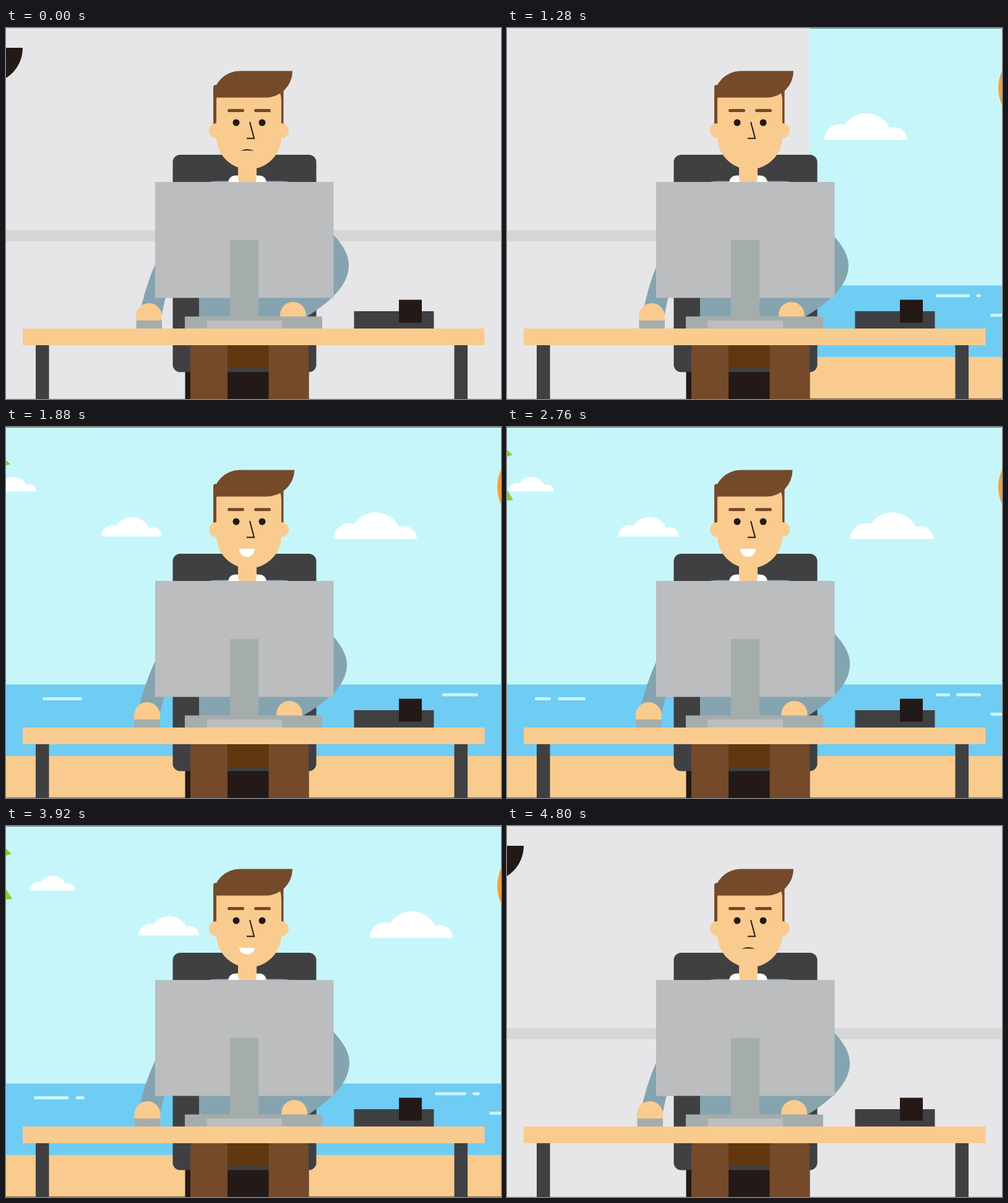
An HTML page that plays this animation: 800 by 600 pixels, repeating every 4840 ms.

```html
<!DOCTYPE html>
<html lang="en">
<head>
<meta charset="utf-8">
<title>Desk daydream</title>
<style>
  html, body { margin: 0; width: 100%; height: 100%; overflow: hidden; background: #e6e6e8; }
  svg { display: block; width: 800px; height: 600px; }
  .skin { fill: #f9cb8f; }
  .hair { fill: #754a2a; }
  .dark { fill: #404042; }
  .black { fill: #231916; }
  .shirt { fill: #85a4af; }
  .panel { fill: #bbbdbf; }
  .metal { fill: #a5adac; }
  .white { fill: #fff; }
  .leaf { fill: #8fc931; }
  .foam { fill: none; stroke: #c6f6fa; stroke-width: 5; stroke-linecap: round; }
</style>
</head>
<body>
<svg viewBox="0 0 800 600">
  <defs>
    <path id="cloud" d="M0 44A25 25 0 0 1 33 20A42 42 0 0 1 106 25A20 20 0 0 1 134 44Z"/>
  </defs>

  <g id="beach">
    <rect width="800" height="417" fill="#c6f6fa"/>
    <rect y="416.5" width="800" height="116" fill="#6fccf3"/>
    <rect class="skin" y="532" width="800" height="68"/>
    <circle cx="862" cy="97" r="68" fill="#f9a03a"/>
    <g class="white">
      <use id="cloud1" href="#cloud"/>
      <use id="cloud2" href="#cloud"/>
      <use id="cloud3" href="#cloud"/>
    </g>
    <path id="foam1" class="foam" d="M47.5 439.5h77" stroke-dasharray="59 16"/>
    <path id="foam2" class="foam" d="M695.5 433h68" stroke-dasharray="53 15"/>
    <path id="foam3" class="foam" d="M783.5 464.5h60" stroke-dasharray="110 22"/>
    <path id="leaf1" class="leaf" d="M-20 20L0 37L9 45L0 48L-20 53Z"/>
    <path id="leaf2" class="leaf" d="M-14 78L0 102L10 118L0 119L-20 121Z"/>
    <path d="M0 .5H800M0 599.5H800" stroke="#000" stroke-opacity=".5"/>
  </g>

  <g id="wall">
    <rect width="800" height="600" fill="#e6e6e8"/>
    <rect y="327" width="800" height="18" fill="#d6d6d6"/>
    <path d="M0 .5H800M0 599.5H800" stroke="#000" stroke-opacity=".1"/>
  </g>
  <path id="lamp" class="black" d="M-89 32H27A58 58 0 0 1 -89 32Z"/>

  <rect class="black" x="289.5" y="540" width="200" height="60"/>
  <rect class="dark" x="269.5" y="205" width="232" height="351.5" rx="12"/>
  <path fill="#613710" d="M350 505H430V550H350Z"/>
  <g class="hair">
    <rect x="298" y="511" width="60" height="100" rx="6"/>
    <rect x="424.5" y="511" width="64.5" height="100" rx="6"/>
  </g>

  <path class="shirt" d="M312 486V262Q318 247.5 340 247.5H445Q470 247.5 480 262V466H462V486Z"/>
  <path id="armL" class="shirt"/>
  <path id="armR" class="shirt"/>
  <path class="white" d="M359 252Q359 238.500 372 238.500H408Q421 238.500 421 252Z"/>
  <path class="skin" d="M375 215H405V240Q405 250 400 252H380Q375 250 375 240Z"/>

  <g id="head">
    <rect class="hair" x="335" y="92" width="113.500" height="69" rx="4"/>
    <g class="skin">
      <circle cx="340" cy="166" r="12"/>
      <circle cx="445" cy="166" r="12"/>
      <path d="M340 176V118Q340 100 352 100H438Q445 103 445 118V176A52.500 52.500 0 0 1 340 176Z"/>
    </g>
    <path id="hair" class="hair"/>
    <g class="hair">
      <rect x="358" y="131" width="27" height="5" rx="2.500"/>
      <rect x="401" y="131" width="27" height="5" rx="2.500"/>
    </g>
    <g class="black">
      <circle cx="372" cy="153" r="5.500"/>
      <circle cx="414" cy="153" r="5.500"/>
    </g>
    <path d="M394 152L401 178.500H389" fill="none" stroke="#231916" stroke-width="2"/>
    <path id="frown" class="black" d="M379 198.500Q390 193.500 401 198.500Q390 197.500 379 198.500Z"/>
    <path id="smile" class="white" d="M-12.500 0H12.500A12.500 13 0 0 1 -12.500 0Z"/>
  </g>

  <rect class="panel" x="241" y="249" width="288.500" height="187.500"/>
  <g id="handL">
    <path class="skin" d="M210 473V466A21 21 0 0 1 252 466V473Z"/>
    <rect class="metal" x="210.500" y="473" width="41.500" height="13"/>
  </g>
  <path id="handR" class="skin" d="M443 468V464A21 21 0 0 1 485 464V468Z"/>
  <rect class="metal" x="362" y="343" width="46" height="130"/>
  <rect class="metal" x="289" y="466.500" width="222" height="20"/>
  <rect class="panel" x="324.500" y="473" width="121.500" height="13"/>

  <g class="dark">
    <rect x="562.500" y="458" width="129" height="28"/>
    <rect x="48" y="512" width="21.500" height="88"/>
    <rect x="724.500" y="512" width="21.500" height="88"/>
  </g>
  <rect class="black" x="635" y="439.500" width="37" height="37"/>
  <rect class="skin" x="27" y="486" width="746.500" height="27"/>
</svg>

<script>
const LOOP = 4840;
const $ = id => document.getElementById(id);
const set = (id, name, value) => $(id).setAttribute(name, value);
const move = (id, x, y = 0, scale = 1) =>
  set(id, "transform", `translate(${x} ${y}) scale(${scale})`);
const clamp = v => Math.min(1, Math.max(0, v));
const span = (t, from, to) => clamp((t - from) / (to - from));
const easeOut = u => 1 - (1 - u) ** 2.3;
const smooth = u => u * u * (3 - 2 * u);

// Eased value at t along [time, value] stops.
function track(t, stops) {
  let [t0, v0] = stops[0];
  for (const [t1, v1] of stops) {
    if (t < t1) return v0 + (v1 - v0) * smooth(span(t, t0, t1));
    [t0, v0] = [t1, v1];
  }
  return v0;
}

const MOUSE = [[1160, 0], [1440, 7.5], [1880, -3], [2760, -2], [3920, -2.5], [4480, 0]];
const TYPING = [[0, 0], [760, 4], [1440, -5.5], [1880, -6], [2760, 0.5], [3920, 2], [4520, 0]];
const LAMP = [[1060, 0], [1200, -30], [4480, -30], [4680, 0]];
const SMILE = [[1270, 0], [1480, 1], [3860, 1], [4080, 0]];
const LEAF_X = [[1720, -14], [1880, -2], [2240, 0]];
const LEAF_Y = [[1720, 28], [1880, 15], [2320, -5], [2640, 0]];
const LEAF2_X = [[1880, -14], [2320, 1], [2640, 0]];

function drawBeach(t) {
  const dt = t - 1440;
  move("cloud1", 517 + dt * 0.0286, 137);
  move("cloud2", 141 + dt * 0.0294, 145, 0.73);
  move("cloud3", -38.5 + dt * 0.0308, 80, 0.55);
  set("foam1", "stroke-dashoffset", -(2.5 + dt * 0.0262));
  set("foam2", "stroke-dashoffset", -(1.2 + dt * 0.0241));
  set("foam3", "stroke-dashoffset", -dt * 0.045);
  move("leaf1", track(t, LEAF_X), track(t, LEAF_Y));
  move("leaf2", track(t, LEAF2_X), track(t, LEAF_Y));
}

function drawArms(t) {
  const l = track(t, MOUSE), r = track(t, TYPING);
  move("handL", l);
  move("handR", r);
  set("armL", "d",
    `M275 320Q${235 + l * 0.5} 380 ${219 + l} 449V468H${251 + l}Q${255 + l * 0.9} 447 ${258 + l * 0.8} 436L275 380Z`);
  const e = 554 + r * 0.5, y = -r * 0.5;
  set("armR", "d",
    `M480 ${290 + y}C515 ${320 + y} ${e} ${350 + y} ${e} ${383 + y * 0.5}` +
    `C${e} 416 ${525 + r * 0.5} 442 ${486 + r} 467H${460 + r}V400Z`);
}

function drawHead(t) {
  const sway = t > 1440 && t < 3920
    ? 3 * Math.exp((1880 - t) / 1400) * Math.sin((t - 1440) / 2480 * Math.PI * 3) : 0;
  set("hair", "d",
    `M335 112.5A43 43 0 0 1 378 69.5H${463 + sway}A${43 + sway} 43 0 0 1 420 112.5Z`);
  const grin = track(t, SMILE);
  set("smile", "transform", `translate(389.5 197) scale(1 ${grin})`);
  set("frown", "visibility", grin > 0 ? "hidden" : "visible");
}

function frame() {
  const t = performance.now() % LOOP;
  const open = easeOut(span(t, 1155, 1810)) - easeOut(span(t, 3945, 4510));
  move("wall", -800 * open);
  move("lamp", track(t, LAMP));
  drawBeach(t);
  drawArms(t);
  drawHead(t);
  requestAnimationFrame(frame);
}
frame();
</script>
</body>
</html>
```
